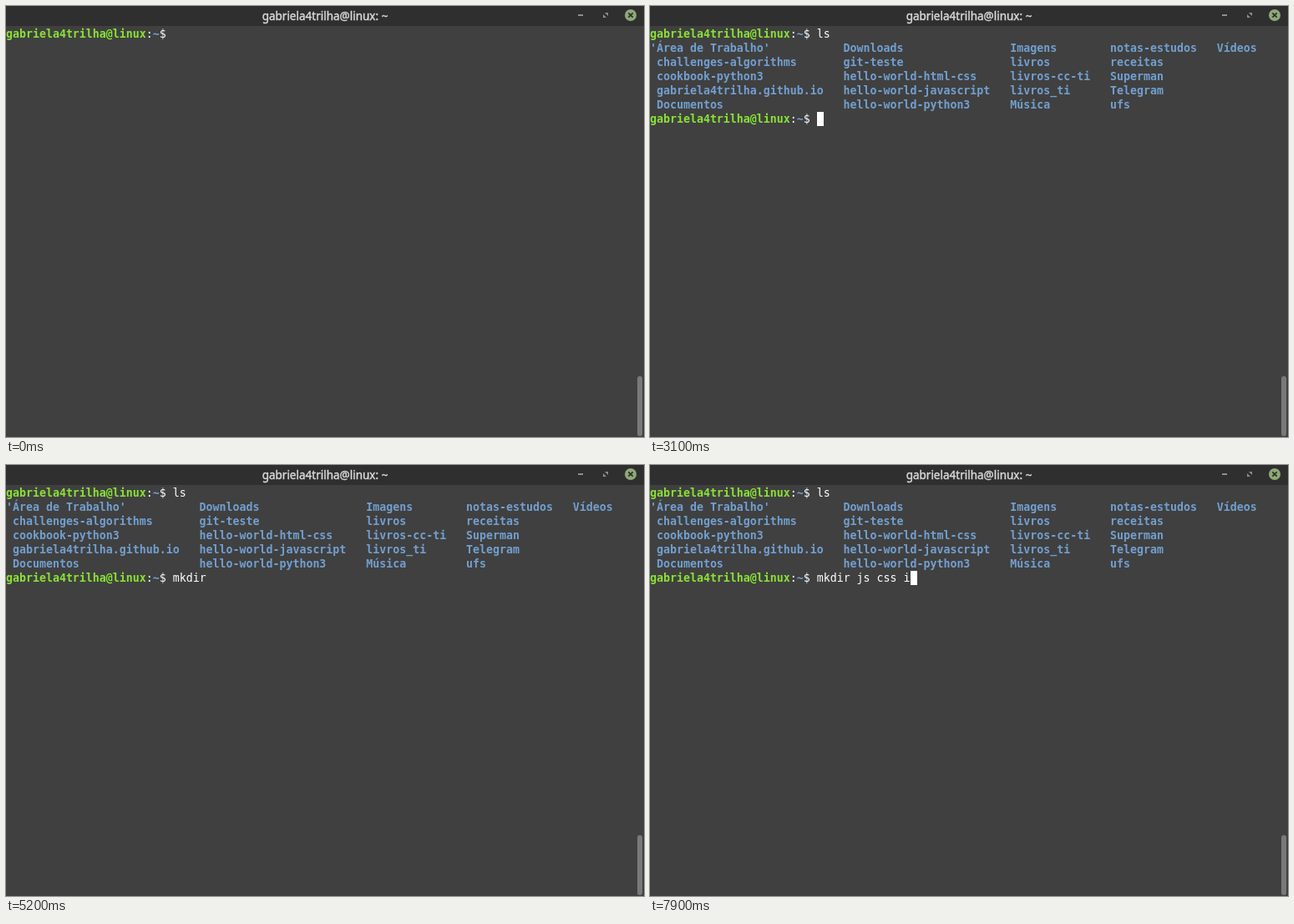
Write an HTML page that moves like this. It is 764 px wide and 517 px high and loops after 8000 ms.

```html
<!DOCTYPE html>
<html lang="pt">
<head>
<meta charset="utf-8">
<title>Terminal</title>
<style>
  html, body { margin: 0; width: 100%; height: 100%; overflow: hidden; background: #404040; }
  #stage { position: relative; width: 764px; height: 517px; overflow: hidden; background: #404040; }
  #bar {
    position: absolute; width: 764px; height: 24px; background: #2f2f2f; color: #dadada;
    font: 13.5px/24px "Noto Sans", sans-serif; text-align: center;
    -webkit-text-stroke: 0.4px #dadada;
  }
  #chrome { position: absolute; left: 0; top: 0; }
  #screen {
    position: absolute; left: 0; top: 25px; margin: 0; color: #fff;
    font: 13.288px/17px "DejaVu Sans Mono", monospace;
  }
  b.user { color: #8ae234; }
  b.dir { color: #729fcf; }
  #cursor { position: absolute; width: 8px; height: 17px; background: #fff; }
</style>
</head>
<body>
<div id="stage">
  <div id="bar"></div>
  <svg id="chrome" width="764" height="517">
    <path d="M685 11h6" stroke="#8f8f8f" stroke-width="2"/>
    <path d="M717 8h4v4zM715 10v4h4z" fill="#8f8f8f"/>
    <circle cx="748" cy="11" r="7" fill="#8fa876"/>
    <path d="M745.3 8.3l5.4 5.4m0-5.4l-5.4 5.4" stroke="#2f2f2f" stroke-width="1.8"/>
    <rect x="756" y="444" width="6" height="72" rx="3" fill="#797979"/>
  </svg>
  <pre id="screen"></pre>
  <div id="cursor"></div>
</div>
<script>
const LOOP = 8000, CELL = 8, ROW = 17, TOP = 25, PROMPT_COLS = 25, LISTED_AT = 2000;
const user = 'gabriela4trilha';
const prompt = `<b class="user">${user}@linux</b>:<b class="dir">~</b>$ `;

const columns = [0, 29, 54, 69, 85];
const listing = [
  ["'Área de Trabalho'", 'Downloads', 'Imagens', 'notas-estudos', 'Vídeos'],
  [' challenges-algorithms', 'git-teste', 'livros', 'receitas'],
  [' cookbook-python3', 'hello-world-html-css', 'livros-cc-ti', 'Superman'],
  [` ${user}.github.io`, 'hello-world-javascript', 'livros_ti', 'Telegram'],
  [' Documentos', 'hello-world-python3', 'Música', 'ufs'],
].map(names => names.reduce((line, name, i) => line.padEnd(columns[i]) + name, ''));

// Key presses for each command, in ms
const first = { text: 'ls', keys: [1300, 1500] };
const second = {
  text: 'mkdir js css i',
  keys: [3300, 3700, 4000, 4100, 4300, 4600, 5900, 6000, 6300, 6900, 7000, 7200, 7500, 7900],
};
// Spans in which the cursor is hidden
const hidden = [[0, 400], [1000, 1300], [2500, 3100], [5200, 5800], [6800, 6900]];

const screen = document.getElementById('screen');
const cursor = document.getElementById('cursor');
document.getElementById('bar').textContent = `${user}@linux: ~`;

const typed = ({ text, keys }, t) => text.slice(0, keys.filter(key => key <= t).length);

let shown = '';
function draw() {
  const t = performance.now() % LOOP;
  const listed = t >= LISTED_AT;
  const input = typed(listed ? second : first, t);
  const before = listed
    ? `${prompt}${first.text}\n<b class="dir">${listing.join('\n')}</b>\n`
    : '';
  const content = before + prompt + input;
  if (content !== shown) screen.innerHTML = shown = content;

  const row = listed ? listing.length + 1 : 0;
  cursor.style.left = (PROMPT_COLS + input.length) * CELL + 'px';
  cursor.style.top = TOP + row * ROW + 'px';
  cursor.hidden = hidden.some(([from, to]) => t >= from && t < to);
  requestAnimationFrame(draw);
}
draw();
</script>
</body>
</html>
```
